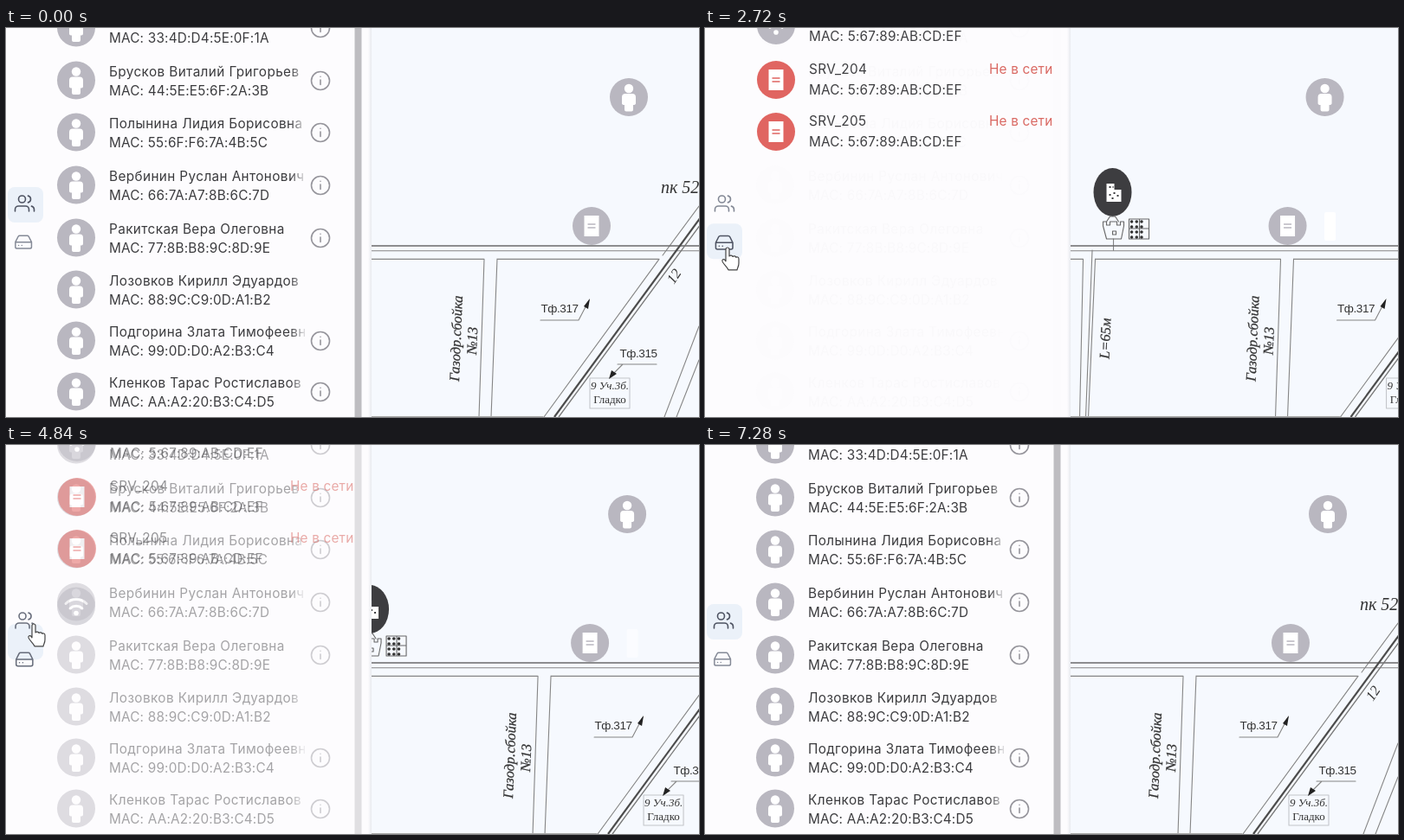
Animation of 800 by 450 pixels, one loop 7.64 s. Source, as an HTML page:

```html
<!DOCTYPE html>
<html lang="ru">
<head>
<meta charset="utf-8">
<title>Панель устройств</title>
<style>
  html, body { margin: 0; width: 100%; height: 100%; overflow: hidden; background: #fdfcfe; }
  svg { display: block; width: 100vw; height: 100vh; }
  text { font: 15.3px Inter, "Open Sans", sans-serif; letter-spacing: .2px; fill: #3b3b3e; }
  .name { letter-spacing: .4px; }
  .offline { fill: #d9655f; }
  .line { fill: none; stroke-linecap: round; stroke-linejoin: round; }
  #map text { font: italic 16.5px "Liberation Serif", serif; letter-spacing: 0; fill: #333; }
  #map .narrow { font: 13.5px "Liberation Sans", sans-serif; letter-spacing: -.4px; text-anchor: middle; }
  #map .small { font-size: 13px; text-anchor: middle; }
</style>
</head>
<body>
<svg viewBox="0 0 800 450">
  <defs>
    <linearGradient id="fade" gradientUnits="userSpaceOnUse" x1="328" x2="348">
      <stop stop-color="#fff"/><stop offset="1" stop-color="#000"/>
    </linearGradient>
    <mask id="cut" maskUnits="userSpaceOnUse" x="0" y="-40" width="800" height="540">
      <rect y="-40" width="800" height="540" fill="url(#fade)"/>
    </mask>
    <linearGradient id="shade">
      <stop stop-color="#e8eaef" stop-opacity="0"/><stop offset="1" stop-color="#e8eaef"/>
    </linearGradient>
    <clipPath id="stage"><path d="M422 0H800V450H422z"/></clipPath>
    <g id="person">
      <circle r="22" fill="#b9b7c0"/>
      <circle cy="-10" r="5.2" fill="#fff"/>
      <path d="M-4-4h8q4 0 4 4v7q0 2-3 2v5.500q0 2-2 2h-6q-2 0-2-2v-5.500q-3 0-3-2v-7q0-4 4-4z" fill="#fff"/>
    </g>
    <g id="doc">
      <circle r="22"/>
      <path d="M-8.500-12h17v24h-17z" fill="#fff"/>
      <path d="M-4.500-2h9m-9 4h9" stroke="currentColor" stroke-width="1.700"/>
    </g>
    <g id="wifi">
      <circle r="22" fill="#b9b7c0"/>
      <path class="line" d="M-12-3a17 17 0 0 1 24 0M-7 2.500a10.500 10.500 0 0 1 14 0" stroke="#fff" stroke-width="3"/>
      <circle cy="8" r="2.800" fill="#fff"/>
    </g>
    <g id="info" class="line" stroke="#96959c" stroke-width="1.600">
      <circle r="10.500"/><path d="M0-1v5.500M0-4.800v.1"/>
    </g>
  </defs>

  <g clip-path="url(#stage)">
    <rect x="422" width="378" height="450" fill="#f6f9fe"/>
    <g id="map">
      <g class="line" stroke="#858585" stroke-width="1.100">
        <path d="M300 257.700H800M300 267.400H324L320 450M338 267.400H552L546 450M338 267L330 450M334.500 257L327 450M567 267.400H754L621 450M567 267L560 450M800 206L758 263M800 345L760 450M800 384L774 450M359 244v13"/>
        <path d="M300 449.500H620" stroke="#aaa"/>
        <path d="M617 338H661L673 315M706 389H751M712 389L698 403"/>
        <path d="M674 405H720V440H674z" stroke="#c4c6ca"/>
      </g>
      <path d="M300 252H800" stroke="#6a6a6a" stroke-width="1.700"/>
      <path d="M802 219L633 450" stroke="#4c4c4c" stroke-width="2.200"/>
      <path d="M802 227L638 450" stroke="#777" stroke-width="1.300"/>
      <path d="M674 313l-2 12-5-3zM696 406l3-10 6 4z" fill="#222"/>
      <text x="756" y="191" style="font-size:20px">пк 52</text>
      <g stroke="#333" stroke-width=".25">
        <text transform="translate(523 409) rotate(-87.700)">Газодр.сбойка</text>
        <text transform="translate(543 378) rotate(-87.700)">№13</text>
        <text transform="translate(354 383) rotate(-87.700)">L=65м</text>
      </g>
      <text transform="translate(771 297) rotate(-56)">12</text>
      <text class="narrow" x="639" y="329">Тф.317</text>
      <text class="narrow" x="730" y="381">Тф.315</text>
      <text class="small" x="697" y="418">9 Уч.3б.</text>
      <text class="small" x="697" y="434" style="font-style:normal">Гладко</text>
      <ellipse cx="358" cy="190" rx="22" ry="28" fill="#3d3d40"/>
      <path d="M351 180h9v7h8v14h-17z" fill="#fff"/>
      <path d="M354 184h2m2 0h1m-5 9h2m3-2h2m-4 6h2m4-3h2" stroke="#3d3d40" stroke-width="2"/>
      <g class="line" stroke="#666" stroke-width="1.100">
        <path d="M347 229v-5h4v4h4v-4h8v4h4v-4h4v5l-3 15h-17zM351 224l4-6h6l4 6M358 235h4v4h-4z"/>
        <path d="M377 221H400V244H377zM389 221v23M377 232h23"/>
        <path d="M380 224h17M380 230h17M380 236h17M380 242h17" stroke="#333" stroke-width="3.500" stroke-dasharray=".1 5.600"/>
      </g>
    </g>
    <g id="pins">
      <rect x="718.500" y="213" width="13" height="33" rx="2" fill="#fff" id="ghost"/>
      <use href="#person" x="719" y="80"/>
      <g transform="translate(676 229)" fill="#b9b7c0" color="#b9b7c0"><use href="#doc"/></g>
    </g>
  </g>
  <rect x="418" width="4" height="450" fill="url(#shade)"/>

  <g id="users"><rect x="402.500" width="8" height="450" fill="#bebdc1"/></g>
  <g id="servers">
    <use href="#wifi" x="82" y="-3"/>
    <use href="#wifi" id="flying" x="81"/>
  </g>

  <rect id="tab" x="2" width="41" height="41" rx="8" fill="#ebf1f9"/>
  <g class="line" stroke-width="1.600">
    <g id="people">
      <path d="M17 21v-2a4 4 0 0 0-4-4H5a4 4 0 0 0-4 4v2M23 21v-2a4 4 0 0 0-3-3.870M16 3.130a4 4 0 0 1 0 7.750"/>
      <circle cx="9" cy="7" r="4"/>
    </g>
    <path id="drive" d="M22 12H2M5.450 5.110L2 12v6a2 2 0 0 0 2 2h16a2 2 0 0 0 2-2v-6l-3.450-6.890A2 2 0 0 0 16.760 4H7.240a2 2 0 0 0-1.790 1.110zM6 16h.01M10 16h.01"/>
  </g>
  <path id="cursor" fill="#fff" stroke="#444" stroke-width="1.200" stroke-linejoin="round"/>
</svg>
<script>
const LOOP = 7640, FADE = 500, OPEN = 2260, BACK = 4605, SHIFT = 114.5;
const HAND = 'M-2 2a2 2 0 0 1 4 0v8c1-1.5 3.5-1.2 4 .5c1-1 3.3-.8 3.8.8c1-1 3.2-.3 3.2 1.6v5c0 4-1.5 5-2 8h-10c-1-3-6-7-7-10c-.5-2 1.5-3 3-1.6l1 1.5z';
const ARROW = 'M0 0v17l4-4 3 7 3-1.2-3-6.800h5.6z';
const $ = id => document.getElementById(id);
const add = (id, html) => $(id).insertAdjacentHTML('beforeend', html);

const people = [
  [0, '', '33:4D:D4:5E:0F:1A'],
  [61, 'Брусков Виталий Григорьев', '44:5E:E5:6F:2A:3B'],
  [121, 'Полынина Лидия Борисовна', '55:6F:F6:7A:4B:5C'],
  [182, 'Вербинин Руслан Антонович', '66:7A:A7:8B:6C:7D'],
  [243, 'Ракитская Вера Олеговна', '77:8B:B8:9C:8D:9E'],
  [303, 'Лозовков Кирилл Эдуардов', '88:9C:C9:0D:A1:B2'],
  [362, 'Подгорина Злата Тимофеевн', '99:0D:D0:A2:B3:C4'],
  [421, 'Кленков Тарас Ростиславов', 'AA:A2:20:B3:C4:D5']
];
for (const [y, name, mac] of people) add('users',
  `<use href="#person" x="81" y="${y - .5}"/>
   <g mask="url(#cut)"><text class="name" x="119" y="${y - 5}">${name}</text></g>
   <text x="119" y="${y + 17}">MAC: ${mac}</text>` +
  (y === 303 ? '' : `<use href="#info" x="363" y="${y}"/>`));

for (const [y, name] of [[-2, ''], [60, 'SRV_204'], [120, 'SRV_205']]) add('servers',
  (name && `<g transform="translate(82 ${y})" fill="#e0625e" color="#e0625e"><use href="#doc"/></g>
   <text class="name" x="120" y="${y - 7}">${name}</text>
   <text class="offline" x="328" y="${y - 7}">Не в сети</text>`) +
  `<text x="120" y="${y + 17}">MAC: 5:67:89:AB:CD:EF</text>`);

const mix = (a, b, k) => a + (b - a) * k;
const ramp = (t, from, to) => Math.min(1, Math.max(0, (t - from) / (to - from)));
const ease = k => k * k * (3 - 2 * k);
const move = (id, x, y, scale = 1) =>
  $(id).setAttribute('transform', `translate(${x} ${y}) scale(${scale})`);
const grey = k => `rgb(${mix(132, 78, k)},${mix(137, 83, k)},${mix(150, 98, k)})`;

// Cursor legs: start, end, from x, y, to x, y
const legs = [
  [2040, 2200, 2, 285, 26, 254],
  [3000, 3560, 26, 254, 32, 207],
  [5400, 5900, 32, 207, 33, 257],
  [7120, 7280, 33, 257, -14, 284]
];

function drawCursor(t) {
  const leg = legs.filter(l => t >= l[0]).pop();
  const shown = leg && t < 7280;
  $('cursor').style.display = shown ? '' : 'none';
  if (!shown) return;
  const [from, to, x0, y0, x1, y1] = leg;
  const k = ease(ramp(t, from, to)), y = mix(y0, y1, k);
  const hand = t >= 2160 && (t < 5400 || t < 5900 && y < 235);
  $('cursor').setAttribute('d', hand ? HAND : ARROW);
  move('cursor', mix(x0, x1, k), y);
}

function draw(now) {
  const t = now % LOOP;
  const p = ease(ramp(t, OPEN, OPEN + FADE)) - ease(ramp(t, BACK, BACK + FADE));
  move('map', SHIFT * p, 0);
  move('pins', -3.5 * p, 0);
  $('ghost').style.opacity = p;
  $('users').style.opacity = 1 - p;
  $('servers').style.opacity = p;
  $('flying').setAttribute('y', 522 - 619 * p);
  $('tab').setAttribute('y', mix(184, 227, p));
  move('people', mix(9.5, 10.5, p), 191);
  move('drive', mix(9, 10.5, p), 236.5, mix(.93, .98, p));
  $('people').style.stroke = grey(1 - p);
  $('drive').style.stroke = grey(p);
  drawCursor(t);
  requestAnimationFrame(draw);
}
requestAnimationFrame(draw);
</script>
</body>
</html>
```
